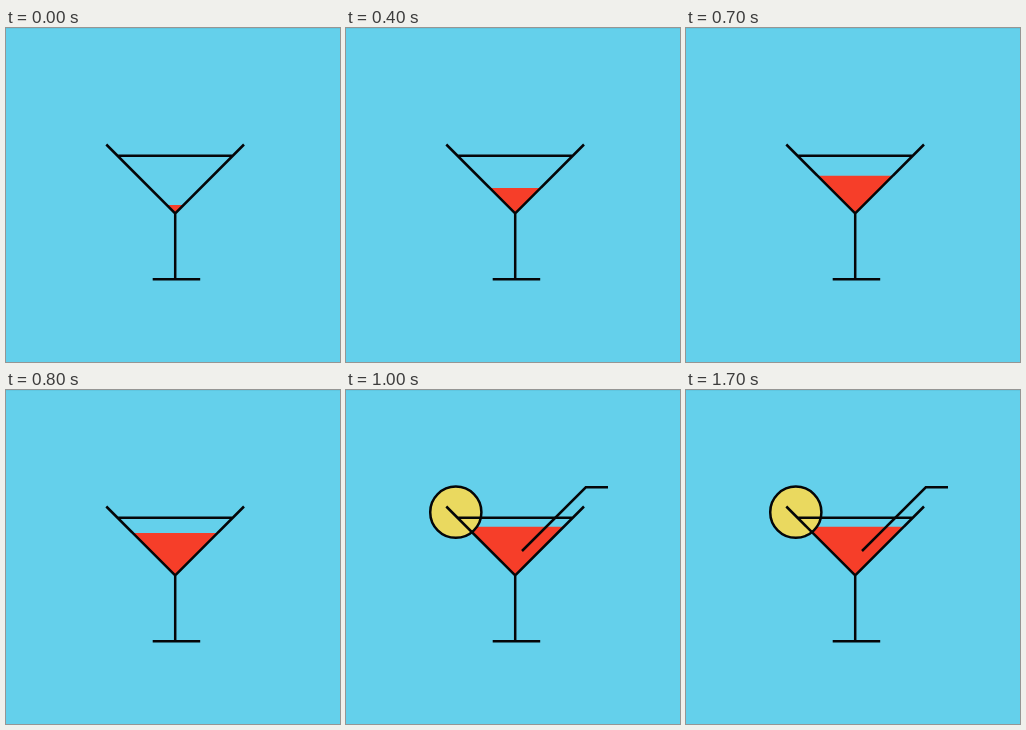
Write an HTML page that moves like this. It is 334x334 px and loops after 1.8 s.

```html
<!DOCTYPE html>
<html lang="en">
<head>
<meta charset="utf-8">
<title>Cocktail</title>
<style>
  html, body { margin: 0; width: 100%; height: 100%; overflow: hidden; background: #64d0eb; }
  svg { display: block; width: 100vw; height: 100vh; }
</style>
</head>
<body>
<svg viewBox="0 0 334 334" fill="none" stroke="#050608" stroke-width="2.5">
  <path d="M0 .5H334" stroke="#5fc6e0" stroke-width="1"/>
  <path id="drink" fill="#f63e29" stroke="none"/>
  <g id="garnish">
    <circle cx="109.8" cy="122.2" r="25.6" fill="#ead95f"/>
    <path d="M262 97.3H239.8L176 161"/>
  </g>
  <path d="M100.3 116.5L169.2 185.4L238 116.5M111 127.7H227M169.2 185V251M146.7 251.2H194.2"/>
</svg>
<script>
  const STEP = 100, LOOP = 1800, GARNISH_AT = 10;
  const TIP = { x: 169.2, y: 185.4 };
  // Height of the liquid's surface at each step; the last value holds.
  const levels = [177, 173.2, 169.4, 164.8, 160, 155, 151.5, 147.8, 143, 138.2, 136.8];
  const drink = document.getElementById('drink');
  const garnish = document.getElementById('garnish');

  function draw(now) {
    const step = Math.floor(now % LOOP / STEP);
    const y = levels[Math.min(step, levels.length - 1)];
    const half = TIP.y - y;
    drink.setAttribute('d', `M${TIP.x - half} ${y}H${TIP.x + half}L${TIP.x} ${TIP.y}Z`);
    garnish.style.display = step >= GARNISH_AT ? '' : 'none';
  }

  function tick() {
    draw(performance.now());
    requestAnimationFrame(tick);
  }
  tick();
</script>
</body>
</html>
```
